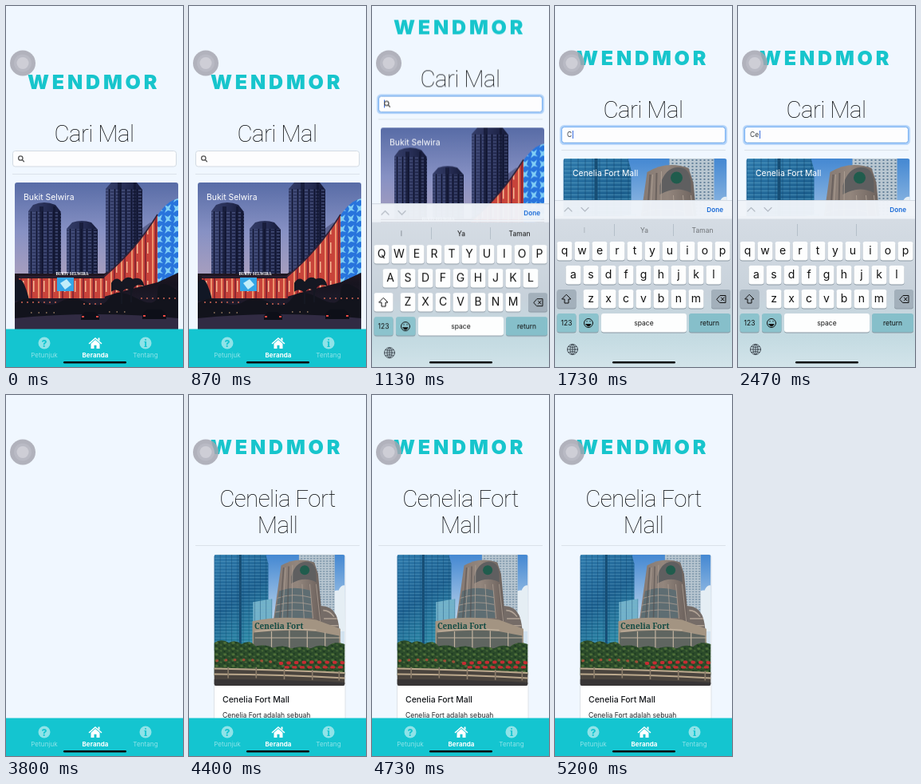
Recreate the animation shown at these times as an HTML page. Size 222 by 452 pixels, loop 5340 ms.

```html
<!DOCTYPE html>
<html lang="id">
<head>
<meta charset="utf-8">
<title>Cari Mal</title>
<style>
html, body { margin: 0; width: 100%; height: 100%; overflow: hidden; background: #f0f7ff; }
svg { display: block; }
#stage { width: 222px; height: 452px; font-family: Inter, Roboto, sans-serif; }
.logo { font-size: 25px; font-weight: 900; letter-spacing: 3.8px; fill: #17c5cc; }
.title { font: 200 29.5px Roboto, sans-serif; letter-spacing: -.6px; fill: #080a0c; }
.mid { text-anchor: middle; }
.label { font-size: 10.4px; fill: #fff; }
.query { font-size: 8.5px; fill: #343a40; }
.tab { font-size: 8px; letter-spacing: .1px; text-anchor: middle; fill: #fff; }
.keys { font-size: 14px; text-anchor: middle; fill: #111; }
.keys .small { font-size: 8.5px; }
.line { fill: none; stroke: #111; stroke-linecap: round; stroke-linejoin: round; }
.sign { font-family: "Noto Serif", serif; font-weight: 700; text-anchor: middle; }

/* One shared 5340 ms clock; switches use step-end, slides carry their own easing. */
.t { animation: 5340ms step-end infinite; }
#list { animation-name: scroll; }
#all { animation-name: before; }
#found { animation-name: after; }
#query0 { animation-name: before; }
#query1 { animation-name: one; }
#query2 { animation-name: two; }
#query3 { animation-name: three; }
.focus { animation-name: focus; }
#caret { animation-name: caret; }
#lists { animation-name: leave; }
#detail { animation-name: enter; }
#keyboard { animation-name: slide; }
#body { animation-name: fade; animation-timing-function: linear; }
#words { animation-name: words; animation-timing-function: linear; }
#letters { animation-name: caps; }
#shift { animation-name: shift; }

@keyframes scroll {
  0% { transform: translateY(0); }
  16.85% { transform: translateY(0); animation-timing-function: cubic-bezier(.215,.61,.355,1); }
  22.47% { transform: translateY(-70px); }
  30.9%, 100% { transform: translateY(-30px); }
}
@keyframes slide {
  0% { transform: translateY(210px); }
  16.85% { transform: translateY(210px); animation-timing-function: cubic-bezier(.215,.61,.355,1); }
  22.47% { transform: translateY(0); }
  56.27% { transform: translateY(0); animation-timing-function: cubic-bezier(.215,.61,.355,1); }
  62.92%, 100% { transform: translateY(210px); }
}
@keyframes fade { 0%, 56.27% { opacity: 1; } 58.4%, 100% { opacity: 0; } }
@keyframes words { 0%, 31.2% { opacity: 1; } 33.7%, 100% { opacity: 0; } }
@keyframes before { 0% { opacity: 1; } 30.9%, 100% { opacity: 0; } }
@keyframes after { 0% { opacity: 0; } 30.9%, 100% { opacity: 1; } }
@keyframes one { 0%, 39.9%, 100% { opacity: 0; } 30.9% { opacity: 1; } }
@keyframes two { 0%, 48.7%, 100% { opacity: 0; } 39.9% { opacity: 1; } }
@keyframes three { 0% { opacity: 0; } 48.7%, 100% { opacity: 1; } }
@keyframes focus { 0%, 56.27%, 100% { opacity: 0; } 16.85% { opacity: 1; } }
@keyframes caret {
  0% { transform: translateX(0); }
  30.9% { transform: translateX(7px); }
  39.9% { transform: translateX(12px); }
  48.7%, 100% { transform: translateX(17px); }
}
@keyframes leave { 0% { opacity: 1; } 69.29%, 100% { opacity: 0; } }
@keyframes enter { 0% { opacity: 0; } 74.9%, 100% { opacity: 1; } }
@keyframes caps { 0% { text-transform: uppercase; } 30.9%, 100% { text-transform: none; } }
@keyframes shift { 0% { fill: #fff; } 30.9%, 100% { fill: #a3b0bb; } }
</style>
</head>
<body>
<svg id="stage" viewBox="0 0 222 452" xmlns="http://www.w3.org/2000/svg">
<defs>
  <linearGradient id="dusk" x2="0" y2="1">
    <stop offset="0" stop-color="#586ca6"/><stop offset=".3" stop-color="#8791c4"/><stop offset=".58" stop-color="#a99fbe"/>
  </linearGradient>
  <linearGradient id="tower" x2="1">
    <stop offset="0" stop-color="#343d68"/><stop offset=".55" stop-color="#262d54"/><stop offset="1" stop-color="#151a38"/>
  </linearGradient>
  <linearGradient id="ground" x2="0" y2="1">
    <stop offset="0" stop-color="#3a202a"/><stop offset=".4" stop-color="#17141f"/><stop offset="1" stop-color="#302a44"/>
  </linearGradient>
  <linearGradient id="day" x2="0" y2="1">
    <stop offset="0" stop-color="#4488d2"/><stop offset=".6" stop-color="#d3e3f0"/>
  </linearGradient>
  <linearGradient id="glass" x2=".4" y2="1">
    <stop offset="0" stop-color="#2f7bad"/><stop offset=".55" stop-color="#1d608f"/><stop offset="1" stop-color="#2d8aa6"/>
  </linearGradient>
  <linearGradient id="stone" x2="1">
    <stop offset="0" stop-color="#81756f"/><stop offset=".5" stop-color="#93867d"/><stop offset="1" stop-color="#655b57"/>
  </linearGradient>
  <linearGradient id="kb" x2="0" y2="1">
    <stop offset="0" stop-color="#d5dce4"/><stop offset=".5" stop-color="#c8d2db"/><stop offset=".8" stop-color="#c4dbe2"/><stop offset="1" stop-color="#d3e4ea"/>
  </linearGradient>
  <pattern id="night" width="7" height="4" patternUnits="userSpaceOnUse">
    <path d="M1 1h4v1.500h-4z" fill="#5a6594" opacity=".6"/><path d="M6.500 0v4" stroke="#101530"/>
  </pattern>
  <pattern id="stripes" width="13" height="24" patternUnits="userSpaceOnUse">
    <path d="M0 0h13v24H0z" fill="#c8433a"/><path d="M3 0h2v24H3z" fill="#ec936c"/>
    <path d="M7 0h2v24H7z" fill="#8c2733"/><path d="M10 3h1.500v14H10z" fill="#f3b893"/>
  </pattern>
  <pattern id="sparkle" width="11" height="13" patternUnits="userSpaceOnUse">
    <path d="M0 0h11v13H0z" fill="#2874dc"/><path d="M1 2l4 2 4-3-2 6 3 3-5-1-4 3 2-5z" fill="#80cef6"/>
  </pattern>
  <pattern id="floors" width="9" height="5" patternUnits="userSpaceOnUse">
    <path d="M0 .5h9" stroke="#6aafd0" stroke-opacity=".5"/><path d="M.5 0v5" stroke="#0f426a" stroke-opacity=".5"/>
  </pattern>
  <pattern id="flats" width="5" height="4" patternUnits="userSpaceOnUse">
    <path d="M1 1h2v2H1z" fill="#66839b"/>
  </pattern>
  <pattern id="leaves" width="13" height="9" patternUnits="userSpaceOnUse">
    <path d="M1 2l4-1 2 3-4 1zM8 6l4-1v3z" fill="#507239"/><path d="M7 1l3 1-2 2zM1 6l4 1-2 2z" fill="#16301c"/>
  </pattern>
  <clipPath id="round"><rect width="205" height="205" rx="3"/></clipPath>

  <symbol id="evening" viewBox="0 0 205 205">
    <g clip-path="url(#round)">
      <path d="M0 0h205v205H0z" fill="url(#dusk)"/>
      <path d="M156 60l14-10 12 6v70h-26z" fill="#5b628f"/>
      <g fill="url(#tower)">
        <path d="M17 121V36l6-8q14-6 28 0l7 9v84z"/>
        <path d="M65 121V58l7-8q12-4 24 0l8 9v62z"/>
        <path d="M114 121V8l7-8h32l7 9v112z"/>
      </g>
      <path d="M17 121V36h41v85zM65 121V58h39v63zM114 121V8h46v113z" fill="url(#night)"/>
      <path d="M31 30h5v91h-5zM48 30h3v91h-3zM81 50h5v71h-5zM129 0h5v121h-5zM149 0h3v121h-3z" fill="#10152f" opacity=".65"/>
      <path d="M0 114H112L205 75V205H0z" fill="url(#ground)"/>
      <path d="M5 120H113V145H5z" fill="url(#stripes)"/>
      <path d="M112 117Q152 85 179 41V125Q145 133 112 143z" fill="url(#stripes)"/>
      <path d="M179 41Q191 23 205 20V113L179 125z" fill="url(#sparkle)"/>
      <path d="M53 119h21v17H53z" fill="#34a6e6"/><path d="M57 126l8-5 6 7-8 6z" fill="#c2eefa"/>
      <path d="M5 118H112Q152 84 179 40" fill="none" stroke="#302237" stroke-width="1.500"/>
      <text x="72" y="116" class="sign" font-size="5" fill="#fff">BUKIT SELWIRA</text>
      <path d="M0 126q7-10 12 2t6 20H0z" fill="#111725"/>
      <path d="M0 151q15-10 30-2t28 0 32 1 28-5 35 0 26-7 26-2v34H0z" fill="#12131c"/>
      <path d="M134 152V126M146 150V120M122 126q6-9 12 0 7-10 14-4 10-4 13 6-12-3-14 8-8-8-13 1-6-6-12-2z" fill="#151722" stroke="#151722" stroke-width="2"/>
      <path d="M0 170q100-10 205 0v35H0z" fill="#312b43"/>
      <path d="M83 167l5-5h12l6 5v5H83zM160 164l6-5h18l6 6v6h-30z" fill="#0d0f18"/>
      <path d="M8 150h48M86 152h26M158 145h44" stroke="#a15046" stroke-width="2" stroke-dasharray="2 5"/>
      <path d="M20 163h34M118 162h28" stroke="#e1b688" stroke-dasharray="1.500 8"/>
      <path d="M84 168h3M102 168h3M161 167h3M186 167h3" stroke="#e94943" stroke-width="2"/>
    </g>
  </symbol>

  <symbol id="noon" viewBox="0 0 205 205">
    <g clip-path="url(#round)">
      <path d="M0 0h205v205H0z" fill="url(#day)"/>
      <path d="M180 66q8-12 15-10 4-10 10-8V120H180z" fill="#e5eef4"/>
      <path d="M133 0h56V120h-56z" fill="#b9c7d1"/><path d="M133 0h56V120h-56z" fill="url(#flats)"/>
      <path d="M0 0h81l4 14V150H0z" fill="url(#glass)"/><path d="M0 0h81l4 14V150H0z" fill="url(#floors)"/>
      <path d="M39 0h4v140h-4z" fill="#174e75"/>
      <path d="M61 74l30-5v78H61z" fill="#73b2c9"/><path d="M61 74l30-5v78H61z" fill="url(#floors)"/>
      <path d="M88 138L105 17Q130 2 157 12L163 30 173 138z" fill="url(#stone)"/>
      <path d="M121 34Q127 12 143 11T160 31V43Q142 33 121 45z" fill="#5f5f60"/>
      <circle cx="142" cy="24" r="7.500" fill="#205c4d"/>
      <path d="M102 57Q124 48 151 56L154 99H95z" fill="#5e6d72"/>
      <path d="M99 68Q124 59 152 67M97 79Q124 71 152 78M96 90Q124 83 153 89M112 20L107 100M123 16L122 100M138 46L141 100M150 46L155 100M160 46L167 110" fill="none" stroke="#ad9f93"/>
      <path d="M109 20L103 100M117 18L115 100" stroke="#514c4b" stroke-opacity=".55" stroke-width="2"/>
      <path d="M167 80q17 0 24 14t6 56h-30z" fill="#756c67"/>
      <path d="M171 87q10 0 17 10M172 100h21M172 111h23M173 123h22" fill="none" stroke="#b1a396" stroke-width="2"/>
      <path d="M60 104Q110 94 160 102L198 116V155H60z" fill="#a39482"/>
      <path d="M62 122Q110 116 160 120L196 127V148H62z" fill="#5f6560"/>
      <path d="M64 120Q110 114 160 118M64 130h134M90 120v26M118 118v28M146 119v28M174 122v26" fill="none" stroke="#c2b39f" stroke-width="1.500"/>
      <text x="101.500" y="116.500" class="sign" font-size="12.500" fill="#174d45">Cenelia Fort</text>
      <g id="trees">
        <path d="M0 138q12-8 23 0 10-6 20 2 12-8 22 3 18-3 27 3 17-6 29 1 18-6 30 0 14-8 26-3 12-10 28-4v49H0z" fill="#2b4b2a"/>
        <path d="M0 138q12-8 23 0 10-6 20 2 12-8 22 3 18-3 27 3 17-6 29 1 18-6 30 0 14-8 26-3 12-10 28-4v49H0z" fill="url(#leaves)"/>
      </g>
      <g fill="none" stroke="#c62c32" stroke-linecap="round">
        <path d="M104 170q50-3 99-1" stroke-width="5" stroke-dasharray="2 10"/>
        <path d="M112 176h92" stroke-width="4" stroke-dasharray="4 8"/>
        <path d="M4 166q45-4 88 2" stroke="#9d4d36" stroke-width="4" stroke-dasharray="1 13"/>
      </g>
      <path d="M0 177Q110 179 205 184V205H0z" fill="#4a443e"/>
      <path d="M0 178Q110 180 205 185M0 187Q110 188 205 193" fill="none" stroke="#bba88c" stroke-width="2.500"/>
      <path d="M22 176v17M66 176v17M110 178v17M154 180v16M196 182v15" stroke="#8b7c6a" stroke-width="2"/>
      <path d="M0 195Q110 195 205 200V205H0z" fill="#383536"/>
    </g>
  </symbol>
</defs>

<rect width="222" height="452" fill="#f0f7ff"/>

<g id="lists" class="t"><g id="list" class="t">
  <text x="27" y="104" class="logo">WENDMOR</text>
  <text x="110.500" y="170" class="title mid">Cari Mal</text>
  <rect x="8.500" y="181.500" width="205" height="19.500" rx="3" fill="#fdfdfe" stroke="#d3dae2"/>
  <g class="focus t">
    <rect x="7.500" y="180.500" width="207" height="22" rx="4" fill="none" stroke="#8cbcf5" stroke-opacity=".6" stroke-width="3"/>
    <rect x="8.500" y="181.500" width="205" height="20" rx="3" fill="none" stroke="#74aff3"/>
    <rect id="caret" class="t" x="15" y="186" width="1" height="10" fill="#3b6fe0"/>
  </g>
  <g id="query0" class="t line" style="stroke:#555;stroke-width:1.3"><circle cx="18.300" cy="190.500" r="2.700"/><path d="M20.500 192.700l2 2"/></g>
  <text id="query1" class="t query" x="15" y="193.500">C</text>
  <text id="query2" class="t query" x="15" y="193.500">Ce</text>
  <text id="query3" class="t query" x="15" y="193.500">Cen</text>
  <path d="M8 210.500h206" stroke="#dbe2ea"/>
  <g id="all" class="t">
    <use href="#evening" x="11" y="221" width="205" height="205"/>
    <text x="22" y="242.500" class="label">Bukit Selwira</text>
  </g>
  <g id="found" class="t">
    <use href="#noon" x="10.500" y="221" width="205" height="205"/>
    <text x="22" y="242.500" class="label">Cenelia Fort Mall</text>
  </g>
</g></g>

<g id="detail" class="t">
  <text x="27" y="74" class="logo">WENDMOR</text>
  <text class="title mid"><tspan x="111" y="139.500">Cenelia Fort</tspan><tspan x="111" y="173">Mall</tspan></text>
  <path d="M8 188.500h206" stroke="#dbe2ea"/>
  <rect x="31.500" y="200" width="164.500" height="260" rx="3" fill="#fff" stroke="#dde2e7"/>
  <use href="#noon" x="31.500" y="200" width="164" height="164"/>
  <text x="42" y="385" font-size="10.500" font-weight="500" fill="#15181c">Cenelia Fort Mall</text>
  <text x="42" y="403.500" font-size="8.600" fill="#212529">Cenelia Fort adalah sebuah</text>
</g>

<g id="tabs">
  <path d="M0 404.500h222V452H0z" fill="#14c5d0"/>
  <g opacity=".52">
    <circle cx="48" cy="422" r="7.500" fill="#fff"/><circle cx="175" cy="422" r="7.500" fill="#fff"/>
    <text x="48" y="440" class="tab">Petunjuk</text><text x="175" y="440" class="tab">Tentang</text>
  </g>
  <g class="mid" font-size="12" font-weight="800" fill="#14c5d0"><text x="48" y="426.500">?</text><text x="175" y="426.500" font-family="Noto Serif, serif">i</text></g>
  <path d="M104.500 422.500l7.500-6.500 7.500 6.500" fill="none" stroke="#fff" stroke-width="1.600" stroke-linecap="round"/>
  <path d="M112 418l5.500 4.800V429h-4v-4.200h-3V429h-4v-6.200zM115.500 415.500h2v4l-2-1.700z" fill="#fff"/>
  <text x="112" y="440" class="tab" font-weight="700">Beranda</text>
</g>

<g id="keyboard" class="t">
  <g id="body" class="t keys">
    <path d="M0 266h222v187H0z" fill="url(#kb)"/>
    <path d="M74.500 273v15M148.500 273v15" stroke="#b4bfc9"/>
    <g id="words" class="t small"><text x="37" y="284" fill="#777f88">I</text><text x="112" y="284">Ya</text><text x="185" y="284">Taman</text></g>
    <g id="letters" class="t"></g>
    <g id="others"></g>
    <g class="line">
      <path d="M14.500 361.500l5.500 5.500h-3v5h-5v-5h-3z"/>
      <path d="M203 367l4-4.500h7v9h-7zM208.500 365l3.500 4M212 365l-3.500 4"/>
      <circle cx="42" cy="397" r="5.500"/><path d="M39 398.500h6q-3 5-6 0zM40 394.500v.5M44 394.500v.5" fill="#111"/>
      <g stroke="#3b444d" stroke-width=".9"><circle cx="22" cy="430" r="6.500"/><ellipse cx="22" cy="430" rx="3" ry="6.500"/><path d="M15.500 430h13M22 423.500v13M17 426.500q5 2 10 0M17 433.500q5-2 10 0"/></g>
    </g>
  </g>
  <path d="M0 243h222v20.500H0z" fill="#f0f4f9" fill-opacity=".97"/>
  <path id="edge" class="t focus" d="M0 263h222v3.500H0z" fill="#eef2f7"/>
  <path d="M0 243.500h222" stroke="#d5dce4"/>
  <path class="line" style="stroke:#b5bcc5;stroke-width:1.200" d="M12 257l4.500-4.500 4.500 4.500M33 252.500l4.500 4.500 4.500-4.500"/>
  <text x="211" y="257.500" text-anchor="end" font-size="8.200" font-weight="600" fill="#1668d6">Done</text>
</g>

<rect x="72" y="445" width="79" height="2.600" rx="1.300" fill="#06090b"/>
<g id="touch"><circle cx="21" cy="71.500" r="16" fill="#a5a5b0" fill-opacity=".84"/><circle cx="21" cy="71.500" r="11" fill="#c0c0ca" fill-opacity=".55"/><circle cx="21" cy="71.500" r="7.500" fill="#d4d4dc" fill-opacity=".75"/></g>
</svg>
<script>
const key = (x, y, w, fill, text = '', cls = '', id = '') =>
  `<rect x="${x}" y="${y + 1}" width="${w}" height="23.500" rx="3" fill="#8a98a3"/>` +
  `<rect ${id} x="${x}" y="${y}" width="${w}" height="23.500" rx="3" fill="${fill}"/>` +
  `<text class="${cls}" x="${x + w / 2}" y="${y + (cls ? 15 : 16)}">${text}</text>`;

const rows = [['qwertyuiop', 12], ['asdfghjkl', 23], ['zxcvbnm', 45]];
document.getElementById('letters').innerHTML = rows.map(([row, start], r) =>
  [...row].map((c, i) => key(start + 22 * i - 9.5, 295 + 30 * r, 19, '#fdfefe', c)).join('')).join('');

document.getElementById('others').innerHTML =
  key(2.5, 355, 24, '#a3b0bb', '', '', 'id="shift" class="t"') +
  key(196, 355, 24, '#a3b0bb') +
  key(2.5, 385, 24, '#8cc3cd', '123', 'small') +
  key(30, 385, 24.5, '#8cc3cd') +
  key(58, 385, 107, '#fdfefe', 'space', 'small') +
  key(168, 385, 52, '#86bfca', 'return', 'small');
</script>
</body>
</html>
```
